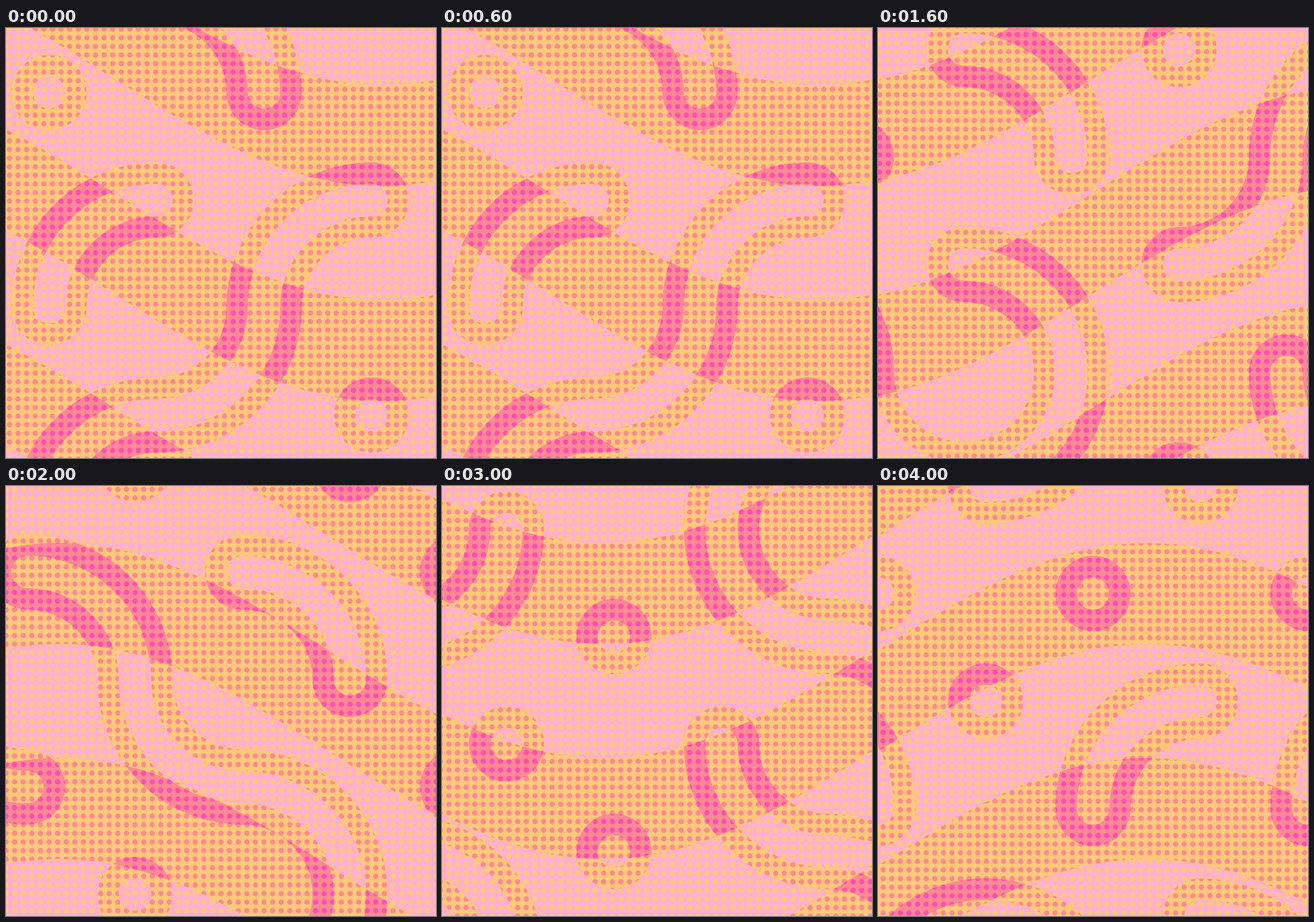
An HTML page with a canvas that plays this animation: 748 by 748 pixels, repeating every 4.1 s.

```html
<!DOCTYPE html>
<html>
<head>
<meta charset="utf-8">
<title>Layered pattern</title>
<style>
  html, body { margin: 0; width: 100%; height: 100%; overflow: hidden; background: #ffb0d0; }
  canvas { display: block; width: 748px; height: 748px; filter: url(#ink); }
  svg { position: absolute; width: 0; height: 0; }
</style>
</head>
<body>
<!-- Overlap count 0..3 becomes pink, orange, salmon, magenta -->
<svg><filter id="ink" x="0" y="0" width="1" height="1" color-interpolation-filters="sRGB">
  <feComponentTransfer>
    <feFuncR type="table" tableValues="1 1 1 1"/>
    <feFuncG type="table" tableValues=".69 .792 .541 .31"/>
    <feFuncB type="table" tableValues=".816 .478 .58 .706"/>
  </feComponentTransfer>
</filter></svg>
<canvas id="stage" width="748" height="748"></canvas>
<script>
const S = 748, TILE = S / 2, STEP = 0.15 * S, PITCH = S / 50;
const LEVEL = '#555';
const g = stage.getContext('2d');
const layer = new OffscreenCanvas(S, S);
const tube = layer.getContext('2d');

// One digit per tile, three rows of three: bits mark quarter arcs
// around the corners top left, top right, bottom right, bottom left
const scenes = ['080440410', '084881212', '088228001', '040128828', '010844488'];

const mod = (a, n) => ((a % n) + n) % n;

function tubePath(n) {
  const path = new Path2D();
  const x0 = mod(-STEP * (n + 1), TILE) - TILE;
  const y0 = mod(STEP * (n + 1), TILE) - TILE;
  const node = (x, y) => { path.moveTo(x, y); path.lineTo(x, y); };
  [...scenes[n]].forEach((digit, i) => {
    const x = x0 + (i % 3) * TILE, y = y0 + Math.floor(i / 3) * TILE, h = TILE / 2;
    node(x + h, y);
    node(x + h, y + TILE);
    node(x, y + h);
    node(x + TILE, y + h);
    [[0, 0], [1, 0], [1, 1], [0, 1]].forEach(([cx, cy], k) => {
      if (!(digit >> k & 1)) return;
      const a = k * Math.PI / 2, px = x + cx * TILE, py = y + cy * TILE;
      path.moveTo(px + h * Math.cos(a), py + h * Math.sin(a));
      path.arc(px, py, h, a, a + Math.PI / 2);
    });
  });
  return path;
}

function drawTubes(n) {
  const path = tubePath(n);
  tube.clearRect(0, 0, S, S);
  tube.lineCap = 'round';
  tube.strokeStyle = LEVEL;
  tube.lineWidth = TILE * 0.35;
  tube.stroke(path);
  tube.globalCompositeOperation = 'destination-out';
  tube.strokeStyle = '#000';
  tube.lineWidth = TILE * 0.15;
  tube.stroke(path);
  tube.globalCompositeOperation = 'source-over';
  g.drawImage(layer, 0, 0);
}

function drawWaves(n) {
  const mid = x => TILE / 2 * Math.cos(Math.PI * (x + S * n - S * 7 / 8) / (S * 1.25));
  const half = TILE * 0.235;
  g.beginPath();
  for (let y = -TILE; y <= S + TILE; y += TILE) {
    for (let x = 0; x <= S; x += 4) g.lineTo(x, y + mid(x) - half);
    for (let x = S; x >= 0; x -= 4) g.lineTo(x, y + mid(x) + half);
    g.closePath();
    g.moveTo(0, y + TILE + mid(0) - half);
  }
  g.fill();
}

function drawDots(n) {
  const x0 = mod(6 - 3 * n, PITCH) - PITCH, y0 = mod(2 + 9.4 * n, PITCH) - PITCH;
  g.beginPath();
  for (let y = y0; y < S + PITCH; y += PITCH)
    for (let x = x0; x < S + PITCH; x += PITCH) {
      g.moveTo(x + 4.7, y);
      g.arc(x, y, 4.7, 0, 7);
    }
  g.fill();
}

function draw(n) {
  g.globalCompositeOperation = 'source-over';
  g.fillStyle = '#000';
  g.fillRect(0, 0, S, S);
  g.globalCompositeOperation = 'lighter';
  g.fillStyle = LEVEL;
  drawWaves(n);
  drawTubes(n);
  drawDots(n);
}

let shown = -1;
function tick() {
  const n = Math.floor(performance.now() % 4100 / 1000);
  if (n !== shown) draw(shown = n);
  requestAnimationFrame(tick);
}
tick();
</script>
</body>
</html>
```
